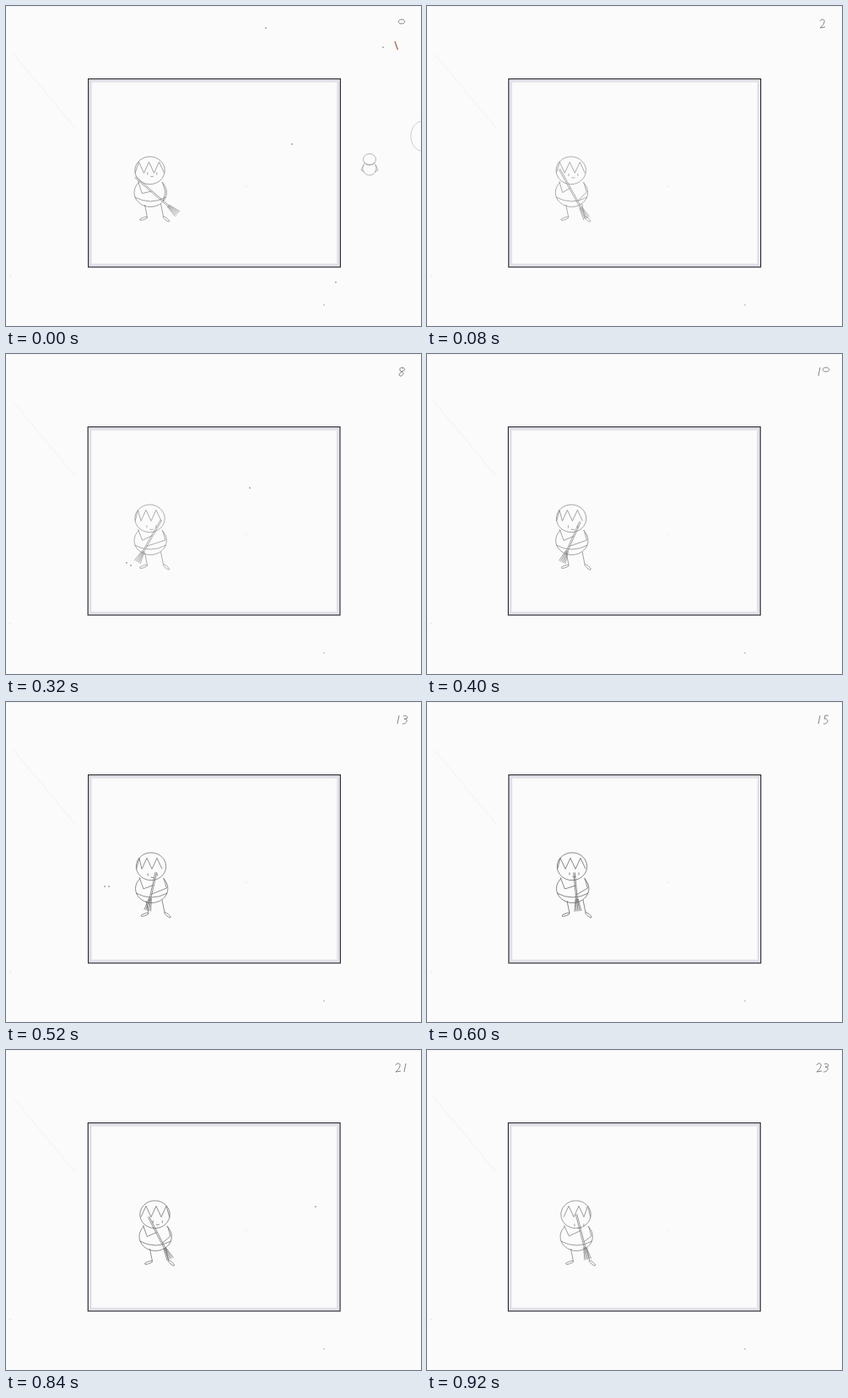
These frames come from a looping animation (492 px wide and 380 px high, 0.96 s). An HTML page with a canvas:

```html
<!DOCTYPE html>
<html lang="en">
<head>
<meta charset="utf-8">
<title>Pencil test: sweeping</title>
<style>
html, body { margin: 0; width: 100%; height: 100%; overflow: hidden; background: #fbfbfb; }
canvas { display: block; }
</style>
</head>
<body>
<canvas id="stage" width="492" height="380"></canvas>
<script>
const ctx = document.getElementById('stage').getContext('2d');
const STEP = 40, DRAWINGS = 24, TAU = 2 * Math.PI;

// The broom and a few body values lead; limbs, hair and face follow from them.
const keys = [
  { at: 0, x: 170.5, turn: -1, eyes: 199, top: [153, 203], tie: [192, 237] },
  { at: 4, x: 171, turn: -2, eyes: 202, top: [161, 184], tie: [172, 241] },
  { at: 8, x: 170.5, turn: -4.5, eyes: 205, top: [184, 197], tie: [163, 234] },
  { at: 13, x: 172, turn: -5, eyes: 205, top: [178, 202], tie: [171, 233] },
  { at: 17, x: 172, turn: 1, eyes: 203, top: [171, 203], tie: [184, 234] },
  { at: 21, x: 176.5, turn: 1.5, eyes: 204, top: [169, 198], tie: [188, 235] },
  { at: 23, x: 176.5, turn: 3.5, eyes: 208, top: [177, 195], tie: [187, 234] }
];

// Pencil digits in a 6 by 10 cell
const digits = [
  'M3 0C-2 0-2 5 3 5S8 0 3 0', 'M4 0L2 10', 'M0 2C1-1 6-1 5 3S1 9 0 10L6 9',
  'M1 1C4-1 7 1 5 4H2C7 4 6 10 0 10', 'M2 0L0 6L5 5M6 1L2 11', 'M6 0H2L1 4C6 3 7 10 0 10',
  'M5 0C0 3-1 10 3 10S5 4 1 6', 'M0 1L6 0L3 10M2 5H6',
  'M5 1C1-2-1 4 3 5S4 11 1 10S2 5 5 4S7 1 4 0', 'M5 2C2-2-1 5 3 5L6 1L4 10'
].map(d => new Path2D(d));

// Dirt on single sheets
const specks = {
  0: [[308, 26], [447, 49], [339, 164], [391, 328]],
  4: [[350, 22], [491, 54]],
  8: [[143, 248], [148, 251], [289, 159]],
  13: [[117, 219], [122, 219]],
  21: [[367, 186]]
};

const mix = (a, b, k) => a + (b - a) * k;
const mixPoint = (p, q, k) => [mix(p[0], q[0], k), mix(p[1], q[1], k)];

function poseAt(n) {
  const i = Math.max(1, keys.findIndex(key => key.at >= n));
  const a = keys[i - 1], b = keys[i], k = (n - a.at) / (b.at - a.at);
  return {
    x: mix(a.x, b.x, k),
    turn: mix(a.turn, b.turn, k),
    eyes: mix(a.eyes, b.eyes, k),
    top: mixPoint(a.top, b.top, k),
    tie: mixPoint(a.tie, b.tie, k)
  };
}

function pen(color, width = 0.7) {
  ctx.strokeStyle = ctx.fillStyle = color;
  ctx.lineWidth = width;
}

function line(...points) {
  ctx.beginPath();
  points.forEach(p => ctx.lineTo(...p));
  ctx.stroke();
}

function oval(x, y, rx, ry, turn = 0, from = 0, to = TAU) {
  ctx.beginPath();
  ctx.ellipse(x, y, rx, ry, turn, from, to);
  ctx.stroke();
}

// Sagging curve of width 2r
function sag(x, y, r, depth) {
  ctx.beginPath();
  ctx.moveTo(x - r, y);
  ctx.quadraticCurveTo(x, y + 2 * depth, x + r, y);
  ctx.stroke();
}

function dot(x, y, r = 0.8) {
  ctx.beginPath();
  ctx.arc(x, y, r, 0, TAU);
  ctx.fill();
}

function drawSheet(n) {
  const x = 97 + 0.6 * Math.cos(0.95 * n), y = 86.6;
  const border = inset => ctx.strokeRect(x + inset, y + inset, 298.8 - 2 * inset, 223.4 - 2 * inset);
  ctx.fillStyle = '#fbfbfb';
  ctx.fillRect(0, 0, 492, 380);
  pen('#f2f2f2', 1);
  line([0, 0.5], [492, 0.5]);
  line([8, 56], [82, 145]);
  pen('#e6e4ec', 2.5);
  border(3);
  pen('#d0ced9', 0.6);
  border(2);
  pen('#2a2833', 1.2);
  border(0);
  pen('#c8c8c8');
  dot(285, 214, 0.6);
  dot(5, 320, 0.6);
  pen('#888');
  dot(377, 355, 0.7);
}

function drawLabel(n) {
  const text = String(n);
  ctx.save();
  ctx.translate(470 - 4 * text.length, 16);
  pen('#777', 0.9);
  for (const d of text) {
    ctx.stroke(digits[d]);
    ctx.translate(8, 0);
  }
  ctx.restore();
}

function drawHead({ x, turn, eyes }) {
  const y = 195.3, rx = 17.7, ry = 16.4;
  oval(x, y, rx, ry);

  // Zigzag fringe, kept inside the head
  const fringe = [];
  for (let i = -3; i <= 3; i++) {
    const dy = i % 2 ? 3 : -10;
    const edge = rx * Math.sqrt(1 - (dy / ry) ** 2);
    fringe.push([x + Math.max(-edge, Math.min(edge, turn + 6 * i)), y + dy]);
  }
  line(...fringe);

  const mid = x + 3 + turn / 4;
  for (const ex of [mid - 5.5, mid + 5.5]) line([ex, eyes - 1.5], [ex, eyes + 1.5]);
  sag(mid, eyes + 3, 2, 0.7);
}

function drawArms({ x, top, tie }) {
  const left = [x - 14, 208], hand = mixPoint(top, tie, 0.5);
  const [ex, ey] = mixPoint(left, hand, 0.3);
  line(left, [ex, ey + 11], hand);
  line([x + 15, 209], [x + 18.5, 221], mixPoint(top, tie, 0.85));
}

function drawLeg(hip, ankle, dx, dy) {
  line(hip, ankle);
  oval(ankle[0] + dx / 2, ankle[1] + dy / 2, Math.hypot(dx, dy) / 2, 1.3, Math.atan2(dy, dx));
}

function drawBroom({ top, tie }) {
  const len = Math.hypot(tie[0] - top[0], tie[1] - top[1]);
  const ux = (tie[0] - top[0]) / len, uy = (tie[1] - top[1]) / len;
  const beside = (p, side, along = 0) => [p[0] - uy * side + ux * along, p[1] + ux * side + uy * along];
  for (const side of [-0.8, 0.8]) line(beside(top, side), beside(tie, side));
  for (let side = -2; side <= 2; side++) line(beside(tie, side * 0.7), beside(tie, side * 2, 15));
}

function drawSweeper(n) {
  const pose = poseAt(n), x = pose.x;
  const grey = 115 - 35 * Math.cos((n - 17) * TAU / DRAWINGS);
  pen(`rgb(${grey}, ${grey}, ${grey})`);
  drawHead(pose);
  oval(x + 0.7, 221.5, 19.2, 17, 0, -TAU / 8, TAU * 5 / 8);
  sag(x + 0.7, 227, 18.5, 5);
  drawArms(pose);
  drawLeg([x - 6, 236], [x - 3, 251], -9, 3);
  drawLeg([x + 13, 235], [x + 16, 250], 7, 6);
  drawBroom(pose);
}

// Scribbles beside the border on the first sheet
function drawDoodles() {
  pen('#999');
  oval(431, 182, 7.5, 6.5);
  oval(431, 193, 8, 8, 0, -TAU / 10, TAU * 0.6);
  sag(431, 186, 7, 3);
  for (const side of [-1, 1]) line([431 + 7 * side, 188], [431 + 10 * side, 195], [431 + 6 * side, 197]);
  pen('#bbb');
  oval(494, 154.5, 14, 18);
  pen('#a0694c', 1.3);
  line([461, 42], [464.5, 52]);
}

function frame(now) {
  const n = Math.floor(now / STEP) % DRAWINGS;
  drawSheet(n);
  pen('#666');
  (specks[n] || []).forEach(p => dot(...p));
  if (n === 0) drawDoodles();
  drawLabel(n);
  drawSweeper(n);
}

const start = performance.now();
function tick() {
  frame(performance.now() - start);
  requestAnimationFrame(tick);
}
tick();
</script>
</body>
</html>
```
